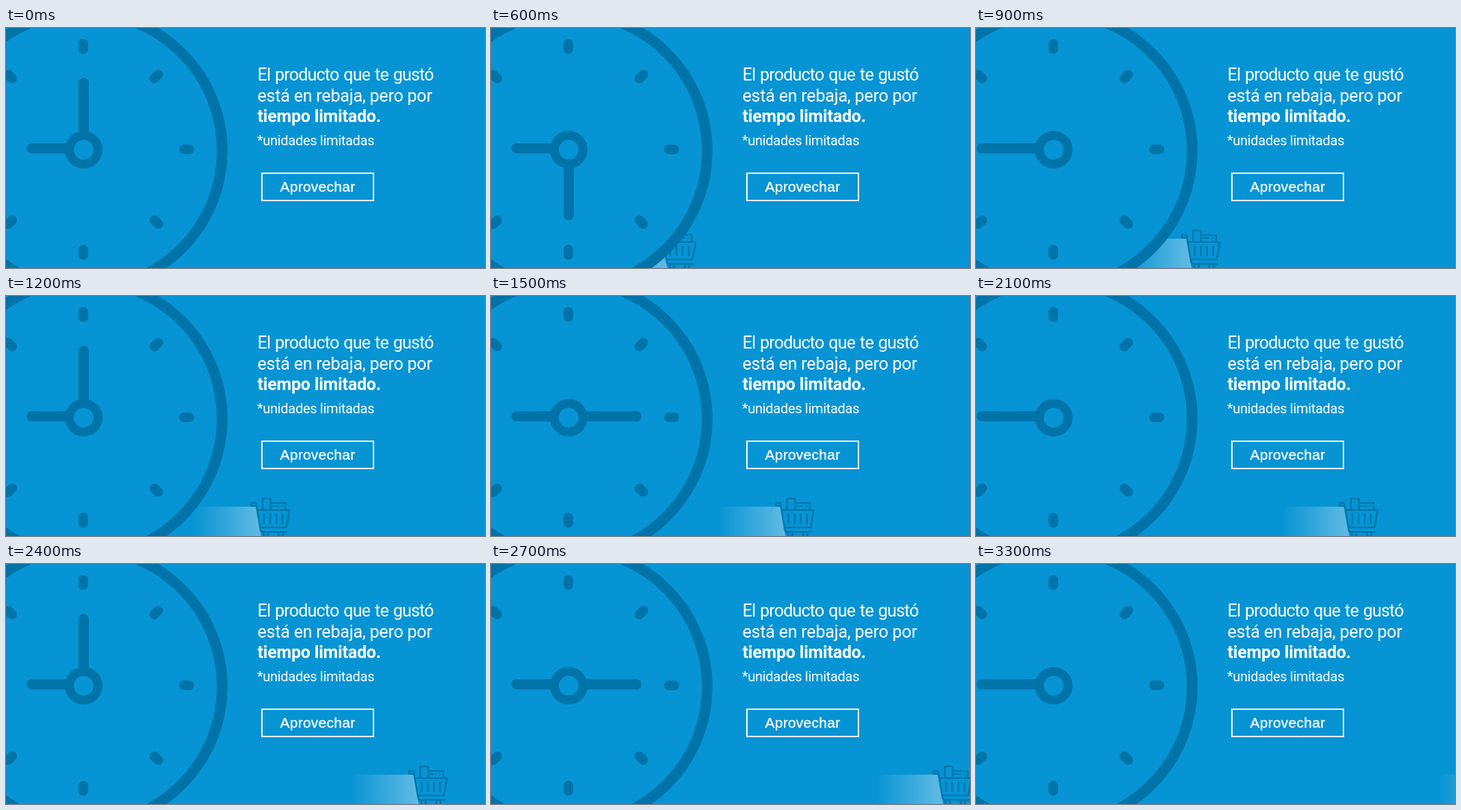
Animation of 700 by 352 pixels, one loop 3.6 s. Source, as an HTML page:

```html
<!DOCTYPE html>
<html lang="es">
<head>
<meta charset="utf-8">
<title>Tiempo limitado</title>
<style>
  html, body { margin: 0; width: 100%; height: 100%; overflow: hidden; background: #0694d4; }
  svg { display: block; width: 700px; height: 352px; }

  .clock, .cart { fill: none; stroke: #0073a8; stroke-linecap: round; }
  .clock { stroke-width: 15; }
  .clock circle { fill: #0694d4; }
  .ticks { stroke-width: 14; }
  .cart { stroke-width: 2.2; stroke-linejoin: round; }

  .ride { animation: ride 3.6s steps(12) infinite; }
  @keyframes ride {
    from { transform: translateX(-230.8px); }
    to { transform: translateX(460.4px); }
  }

  .hand { animation: tick 1.2s step-end infinite; }
  .right { animation-delay: -.9s; }
  .down { animation-delay: -.6s; }
  .left { animation-delay: -.3s; }
  @keyframes tick {
    0% { visibility: visible; }
    25%, 100% { visibility: hidden; }
  }

  text { fill: #fff; font: 25px Roboto, sans-serif; letter-spacing: -.2px; }
  .lead { letter-spacing: -.8px; word-spacing: 1.5px; }
  .strong { font-weight: 700; }
  .note { font-size: 20px; letter-spacing: -.3px; }
  .label {
    font: 21px "Liberation Sans", Arial, sans-serif; letter-spacing: .25px;
    stroke: #fff; stroke-width: .35px;
  }
</style>
</head>
<body>
<svg viewBox="0 0 700 352">
  <defs>
    <linearGradient id="glow">
      <stop offset="0" stop-color="#fff" stop-opacity="0"/>
      <stop offset="1" stop-color="#fff" stop-opacity=".37"/>
    </linearGradient>
    <path id="mark" d="M113 23v8"/>
  </defs>

  <g class="ride">
    <path d="M272 309H366L373 352H272Z" fill="url(#glow)"/>
    <g class="cart">
      <path d="M366 308H359V303.500H365.500L372 342Q372.500 346 376 346H411"/>
      <path d="M367 314H414.500L410 339.500H372"/>
      <path d="M377.500 320V333.500M386.500 320V333.500M395.500 320V333.500M404.500 320V333.500"/>
      <path d="M375.500 313V297H387V313M387 303.500H409V313M390 308H398M403.500 308H404"/>
      <circle cx="380" cy="349.500" r="3.500"/>
      <circle cx="402" cy="349.500" r="3.500"/>
    </g>
  </g>

  <g class="clock">
    <circle cx="113" cy="180" r="203" stroke-width="15.400"/>
    <g class="ticks">
      <use href="#mark"/>
      <use href="#mark" transform="rotate(45 113 178)"/>
      <use href="#mark" transform="rotate(90 113 178)"/>
      <use href="#mark" transform="rotate(135 113 178)"/>
      <use href="#mark" transform="rotate(180 113 178)"/>
      <use href="#mark" transform="rotate(225 113 178)"/>
      <use href="#mark" transform="rotate(315 113 178)"/>
    </g>
    <path d="M37.500 176.500H100"/>
    <path class="hand up" d="M113.500 165V80.500"/>
    <path class="hand right" d="M127 176.500H212.500"/>
    <path class="hand down" d="M113.500 192V274.500"/>
    <path class="hand left" d="M100 176.500H8.500"/>
    <circle cx="113.500" cy="178.500" r="21" stroke-width="13"/>
  </g>

  <text class="lead" x="367.500" y="77">El producto que te gustó</text>
  <text x="367.500" y="108">está en rebaja, pero por</text>
  <text class="strong" x="367.500" y="138">tiempo limitado.</text>
  <text class="note" x="367" y="172">*unidades limitadas</text>
  <rect x="374" y="213" width="163" height="40" fill="none" stroke="#fff" stroke-width="2"/>
  <text class="label" x="400.500" y="240">Aprovechar</text>
</svg>
</body>
</html>
```
